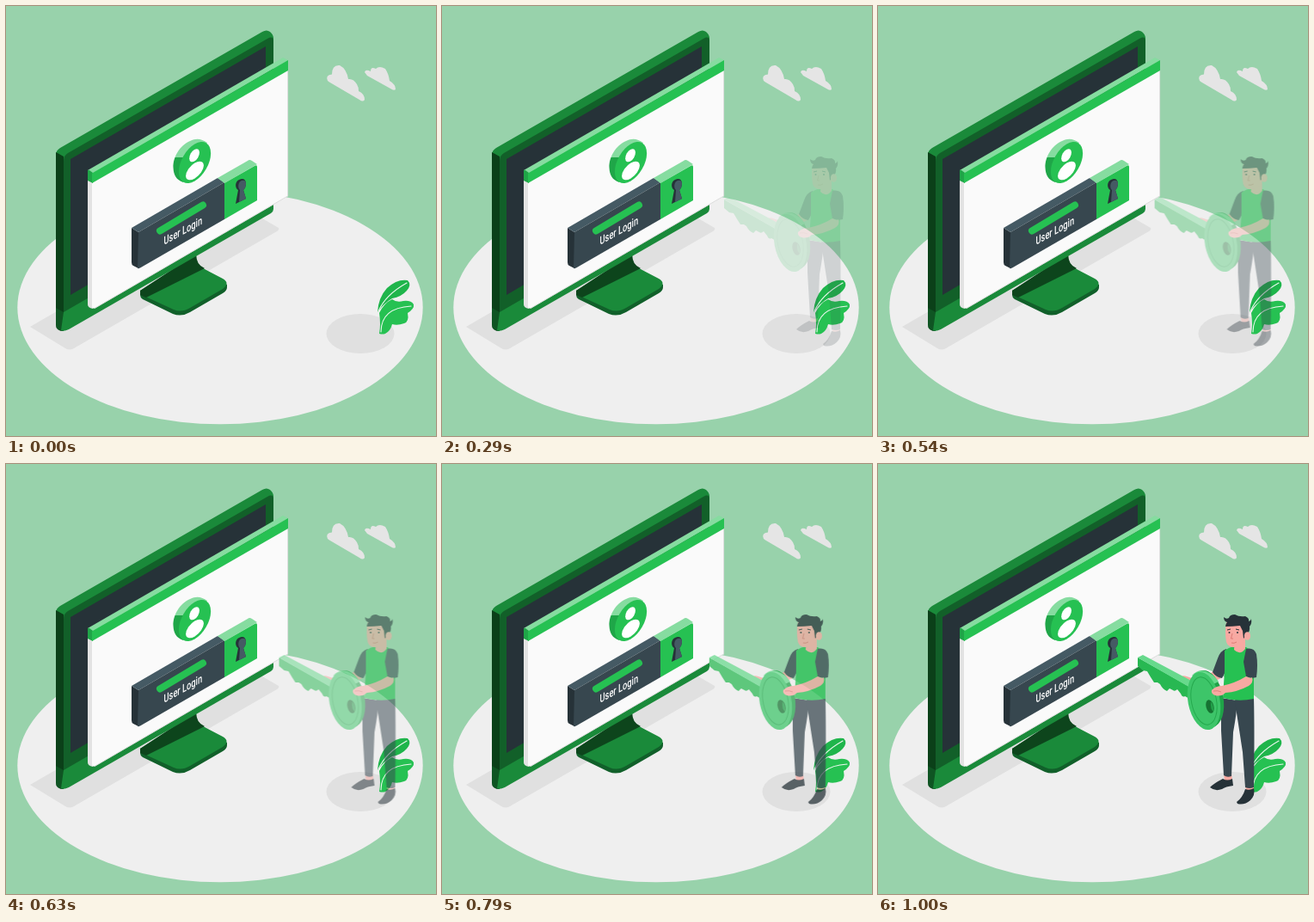
An HTML page without scripts that plays this animation: 500 px wide and 500 px high, repeating every 1040 ms.

```html
<!DOCTYPE html>
<html lang="en">
<head>
<meta charset="utf-8">
<title>User Login</title>
<style>
html, body { margin: 0; width: 100%; height: 100%; overflow: hidden; background: #98d2ab; }
svg { display: block; width: 100vw; height: 100vh; }
text { font: 500 13.5px Roboto, Arial, sans-serif; fill: #fff; }
.green { fill: #26c152; }
.light { fill: #86dca0; }
.slate { fill: #37474f; }
.ink { fill: #263238; }
.leaf { fill: #1a8a3a; }
.skin { fill: #f8a9a2; }
.shade { fill: #e0e0e0; }
.vein { fill: none; stroke: #eaf8ee; stroke-width: 1.1; stroke-linecap: round; }
.man { animation: arrive 1040ms infinite; }
@keyframes arrive {
  0% { transform: translateX(31px); opacity: 0; animation-timing-function: steps(7); }
  27.8% { transform: translateX(26px); opacity: .17; animation-timing-function: steps(4); }
  44.2% { transform: translateX(21px); opacity: .33; animation-timing-function: steps(4); }
  60.5% { transform: translateX(15.5px); opacity: .52; animation-timing-function: steps(4); }
  75.9% { transform: translateX(8.8px); opacity: .73; animation-timing-function: steps(2); }
  84.5% { transform: translateX(5px); opacity: .85; animation-timing-function: steps(3); }
  96.1%, 100% { transform: none; opacity: 1; }
}
</style>
</head>
<body>
<svg viewBox="0 0 500 500">
  <defs>
    <linearGradient id="rim" x1="0" y1="0" x2="0" y2="1">
      <stop offset=".42" stop-color="#86dca0"/>
      <stop offset=".42" stop-color="#1fa648"/>
    </linearGradient>
  </defs>

  <rect width="500" height="500" fill="#98d2ab"/>
  <ellipse cx="249" cy="350.5" rx="235.7" ry="135.8" fill="#efefef"/>
  <path class="shade" d="M28 373 L272 232 L317 258 Q318 260 315 262 L79 398 Q74 401 69 398z"/>
  <ellipse class="shade" cx="412" cy="381" rx="39.5" ry="23"/>

  <g fill="#e5e5e5">
    <path d="M374 87 Q371 80 379 79.5 Q379 68 388 69 Q396 73 398 85 Q404 84 408 91 Q410 94 410 99 Q417 102 417 109 Q415 112 411 109 L376 88.5z"/>
    <path d="M417 77 Q418 73 424 76 Q424 70 430 73 Q434 69 441 73 Q445 79 446 87 Q453 91 453 97 Q451 99 447 96 L420 81z"/>
  </g>

  <g id="stand">
    <path fill="#11602a" d="M156 331 L229 305 L257 324 V327 Q257 331 252 334 L214 356 Q204 362 194 358 L159 341 Q156 339 156 336z"/>
    <path class="leaf" d="M156 331 L221 290 Q221 301 229 305 L252 317 Q261 322 252 329 L214 351 Q204 357 195 353 L160 337z"/>
    <path fill="#0d451c" d="M156 331 L156 336 L163 339 L231 305 Q221 301 221 288z"/>
  </g>

  <g id="monitor">
    <path class="leaf" d="M58 173 Q58 168 63 165 L298 30 Q303 27 307 30 Q311 33 311 38 V60 L67 180z"/>
    <path fill="#0b4019" d="M58 170 L67 175 V378 Q58 378 58 370z"/>
    <path fill="#0f5523" d="M58 351 L67 356 V378 Q58 378 58 370z"/>
    <path fill="#126029" d="M67 180 Q67 174 72 171 L304 38 Q311 34 311 41 V225 L67 358z"/>
    <path class="ink" d="M75 178 L302 47 V203 L75 336z"/>
    <path class="leaf" d="M67 356 L311 215 V236 Q311 239 308 241 L73 376 Q67 379 64 377z"/>
  </g>

  <g id="window">
    <path fill="#e3e3e3" d="M95 200 L101 204 V352 Q95 351 95 347z"/>
    <path fill="#fafafa" d="M100 203 L328 72 V221 L104 351 Q100 353 100 349z"/>
    <path fill="none" stroke="#dcdcdc" d="M327.6 75 V221 L103 351.5"/>
    <path class="light" d="M95 191 L322 60 L328 63 L101 195z"/>
    <path fill="#20a548" d="M95 192 Q95 190 97 191 L101 194 V206 L95 203z"/>
    <path class="green" d="M100 194.5 L328 63 V75 L100 206z"/>
  </g>

  <g id="avatar">
    <path fill="url(#rim)" d="M194.5 188 C194 176 202 162 214 157 C222 153 228 155 234 159 L206 205 C198 202 195 197 194.5 188z"/>
    <g transform="matrix(.866 -.5 0 1 219.5 182)">
      <circle class="green" r="21.5"/>
      <circle cx="-.5" cy="-8.5" r="6.8" fill="#fff"/>
      <ellipse cy="9.5" rx="12" ry="9" fill="#fff"/>
    </g>
  </g>

  <g id="login">
    <path class="ink" d="M146 258 L154 263 V305 L148 302 Q146 301 146 298z"/>
    <path fill="#455a64" d="M146 258 L246 200 L254 205 L154 263z"/>
    <path class="slate" d="M154 263 L254 205 V248 L156 304.5 Q154 305.5 153 305z"/>
    <path class="light" d="M246 200 L281 180 Q283 178 286 180 L292 184 L254 206z"/>
    <path class="green" d="M254 206 L289 186 Q292 184 292 187 V226 L254 248z"/>
    <path d="M179 261.5 L229 231.5" stroke="#26c152" stroke-width="8" stroke-linecap="round"/>
    <text transform="matrix(.69 -.38 0 1 183.5 278)">User Login</text>
    <path class="ink" d="M270 214 C266 212 266 204 271 202 Q278 199 279 206 Q279 211 276 214 L279 224 L267 230z"/>
    <path fill="#455a64" d="M272 214 C269 211 270 204 274 203 Q279 202 279 207 Q279 211 276 214 L279 224 L271 228z"/>
  </g>

  <g id="plant">
    <path fill="#1fb54b" d="M432 356 Q433 339 443 328 Q455 317 467 319 Q472 324 466 331 Q460 338 449 340 Q440 345 432 356z"/>
    <path class="green" d="M434 381 Q436 370 434 357 Q440 345 449 341 Q454 345 462 343 Q471 342 474 347 Q475 352 467 357 Q469 367 463 369 Q455 372 449 370 Q447 378 441 381 Q438 382 434 381z"/>
    <path class="vein" d="M433 355 Q441 336 466 322 M436 379 Q436 351 471 349"/>
  </g>

  <g class="man">
    <g id="legs">
      <path class="skin" d="M402 360 H411 L412 368 H403z M427 374 H437 V379 H428z"/>
      <path class="ink" d="M386 376 Q391 371 401 366 Q406 369 412 366 L413 374 Q404 375 400 378 Q392 381 386 376z"/>
      <path class="ink" d="M417 393 Q424 388 427 378 Q432 380 437 377 Q439 385 433 391 Q426 397 418 395z"/>
      <path class="slate" d="M399 272 L418 275 Q417 290 413 312 L411 363 Q406 365 402 362 L399 310z"/>
      <path class="slate" d="M415 272 L437 272 Q438 310 437 376 Q432 378 427 376 L424 335 L416 283z"/>
    </g>

    <g id="body">
      <path class="skin" d="M390 241 L399 249 Q384 257 366 256 L352 249 Q353 245 359 247 L374 252z"/>
      <path class="slate" d="M405 215 Q398 217 395 226 L389 242 Q393 248 400 249 L406 238z"/>
      <path class="green" d="M403 217 Q408 213 415 212 L428 213 L434 217 L437 245 V273 Q419 277 401 272 L403 240z"/>
      <path class="skin" d="M415 205 L427 203 L427 215 Q421 223 414 216z"/>
      <path class="slate" d="M428 215 Q437 213 440 221 Q442 234 440 248 Q434 250 428 247 L425 230z"/>
    </g>

    <g id="head">
      <path class="skin" d="M405 184 H427 V206 Q424 212 414 213 Q407 213 405 207 Q403 196 405 184z"/>
      <path class="ink" d="M404 189 Q404 186 406 184 Q402 183 402 178 Q405 181 408 179 Q409 175 415 175 Q420 178 427 177 Q432 179 431 183 Q434 182 434 180 Q435 186 432 189 Q433 194 429 198 L425 203 L424 194 Q422 190 421 188 Q412 189 404 189z"/>
      <ellipse class="skin" cx="429.5" cy="200" rx="3.6" ry="4.8"/>
      <g class="ink">
        <circle cx="408.5" cy="196" r="1"/>
        <circle cx="418" cy="196" r="1"/>
      </g>
      <path d="M406 193 L410 192 M416 192 L420 193" stroke="#263238" fill="none"/>
      <path d="M412 197 L410.5 203 H413 M411 208 Q414 209 417 207" stroke="#d97770" fill="none" stroke-width=".9"/>
    </g>

    <g id="key">
      <path fill="#28b852" d="M302 225 L364 260 V274 L357 270 Q354 272 352 267 L348 262 Q345 265 343 263 L339 261 L336 264 Q331 262 328 256 L325 254 L321 254 Q317 248 313 241 L308 240 L302 235z"/>
      <path fill="#67d98c" d="M302 225 L308 222 L368 254 L363 260z"/>
      <ellipse cx="383" cy="273" rx="18.5" ry="33.5" transform="rotate(-11 383 273)" fill="#1fa348"/>
      <path fill="#67d98c" d="M365 246 Q372 238 381 241 Q390 244 396 253 L390 256z"/>
      <ellipse cx="379" cy="275.5" rx="18.5" ry="34" transform="rotate(-11 379 275.5)" fill="#3dc569"/>
      <ellipse cx="379" cy="275.5" rx="14.5" ry="28" transform="rotate(-11 379 275.5)" fill="none" stroke="#25a94e" stroke-width="1"/>
      <ellipse cx="386" cy="282" rx="4.5" ry="8" transform="rotate(-14 386 282)" fill="#167332"/>
      <path fill="#219e48" d="M387 276 Q391 281 390 288 Q386 285 387 276z"/>
    </g>

    <path class="skin" d="M428 247 Q434 250 435 248 Q437 254 431 258 Q418 265 404 266 Q399 271 392 269 Q387 267 388 263 Q393 258 400 258 Q415 255 428 247z"/>
    <path d="M390 264 Q395 263 399 265" stroke="#d97770" stroke-width=".8" fill="none"/>
  </g>
</svg>
</body>
</html>
```
